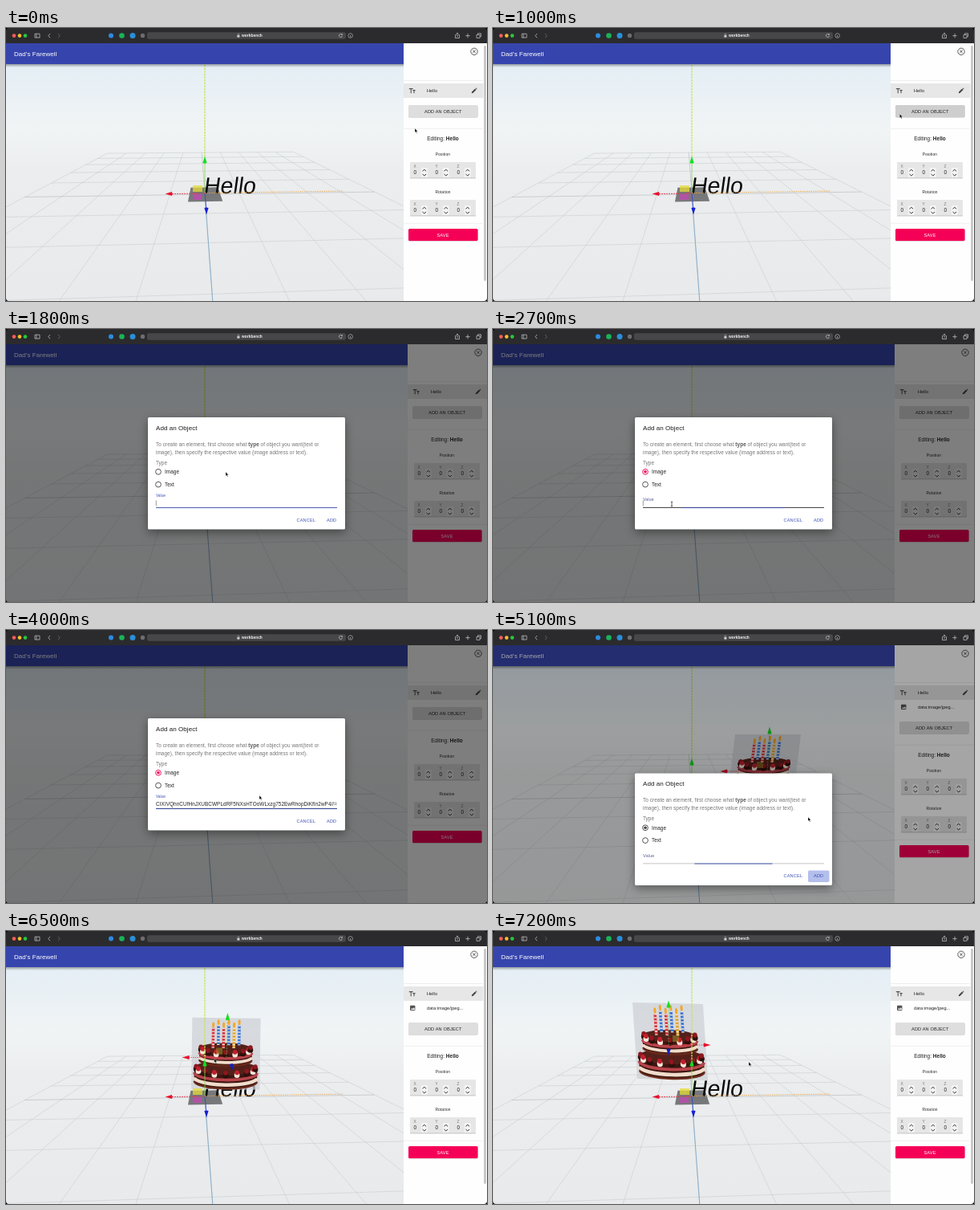
An HTML page for the animation above (7300 ms loop, 600 by 340 pixels).

```html
<!DOCTYPE html>
<html lang="en">
<head>
<meta charset="utf-8">
<title>Object editor</title>
<style>
html, body { margin: 0; width: 100%; height: 100%; overflow: hidden; background: #000; }
svg { display: block; width: 600px; height: 340px; }
text { font-family: "Liberation Sans", Arial, Helvetica, sans-serif; white-space: pre; }
#paper { filter: drop-shadow(0 4px 6px rgba(0,0,0,.4)); }
</style>
</head>
<body>
<svg id="stage" viewBox="0 0 600 340" xmlns="http://www.w3.org/2000/svg"></svg>
<script>
const LOOP = 7300, STEP = 100;
const OPEN = 1072, PICK = 2200, FOCUS = 2651, PASTE = 3400, CLOSE = 5027, BLUR = 5051;
const INDIGO = '#3f51b5', PINK = '#f50057';
const $ = id => document.getElementById(id);

// Markup helpers
const text = (x, y, size, str, more = '') =>
  `<text x="${x}" y="${y}" font-size="${size}" letter-spacing=".06" ${more}>${str}</text>`;
const mid = 'text-anchor="middle"';
const rect = (x, y, w, h, fill, more = '') =>
  `<rect x="${x}" y="${y}" width="${w}" height="${h}" fill="${fill}" ${more}/>`;
const circle = (x, y, r, fill, more = '') =>
  `<circle cx="${x}" cy="${y}" r="${r}" fill="${fill}" ${more}/>`;
const line = (x1, y1, x2, y2, stroke, w, more = '') =>
  `<line x1="${x1}" y1="${y1}" x2="${x2}" y2="${y2}" stroke="${stroke}" stroke-width="${w}" ${more}/>`;
const path = (d, stroke, w = .8, fill = 'none') =>
  `<path d="${d}" fill="${fill}" stroke="${stroke}" stroke-width="${w}"/>`;
const caps = (x, y, str, fill, more = '') =>
  `<text x="${x}" y="${y}" font-size="5.6" letter-spacing=".16" fill="${fill}" ${more}>${str}</text>`;
const head = (x, y, turn, fill) =>
  `<path d="M-4 -2.6L4.5 0L-4 2.6Q-5 0 -4 -2.6z" fill="${fill}" transform="translate(${x} ${y}) rotate(${turn})"/>`;

// Ground plane seen by a slightly turned camera
function ground(x, z) {
  const a = .033, s = 1 / (.02294 - .004033 * (z - a * x));
  return [248 + (x + a * z) * s, 96 + s / .392];
}
function gridLine(x1, z1, x2, z2, color, w = .5) {
  return line(...ground(x1, z1), ...ground(x2, z2), color, w);
}
function grid() {
  let s = '';
  for (let i = -5; i <= 5; i++) {
    const c = i ? '#c3c7ca' : '#a9adb0';
    s += gridLine(-5, i, 5, i, c) + gridLine(i, -5, i, 5, c);
  }
  return s + gridLine(0, 0, 0, 5, '#6c9fc6', .7);
}

function scene() {
  const plate = [[-.42, -.48], [.42, -.48], [.46, .42], [-.46, .42]].map(p => ground(...p)).join(' ');
  return rect(0, 45, 501, 295, 'url(#sky)') + grid() +
    `<polygon points="${plate}" fill="#77787a"/>` +
    `<text font-size="28.5" fill="#0b0b0b" transform="translate(246 206) skewX(-8)">Hello</text>` +
    `<g id="cake">${cake()}</g>` +
    line(248, 46, 248, 160, '#c4e64e', 1.3, 'stroke-dasharray="2.6 1"') +
    line(248, 167, 248, 205, '#7fd64a', .8) +
    line(207, 206.5, 248, 206, '#e8304a', .9, 'stroke-dasharray="2 1"') +
    line(248, 205.5, 421, 203, '#efaa4a', .9, 'stroke-dasharray="1.5 1.2"') +
    line(248, 206, 250, 226, '#3540d8', .8) +
    rect(233, 196, 12, 8, '#e6dc36', 'opacity=".75"') +
    rect(233, 207, 11, 7, '#d23fc0', 'opacity=".65"') +
    head(203, 206.5, 180, '#e8102c') + head(248, 164, -90, '#12e01e') + head(250, 228, 90, '#1420d8') +
    '<g id="axes"></g>';
}

// Two-tier cake on a 100 by 100 board
function tier(x, y, w, h, r) {
  const d = `M${x} ${y}v${h}a${w / 2} ${r} 0 0 0 ${w} 0v${-h}z`;
  const band = (k, c, t) => path(`M${x} ${y + h * k}a${w / 2} ${r} 0 0 0 ${w} 0`, c, t);
  let s = path(d, 'none', 0, '#3b1610') + band(.36, '#b8434b', 4) + band(.72, '#f1dccb', h * .26) +
    band(1, '#6b2a1a', 2.5) +
    `<ellipse cx="${x + w / 2}" cy="${y}" rx="${w / 2}" ry="${r}" fill="#54211a"/>`;
  for (let i = 0; i <= 8; i++) {
    const a = Math.PI * i / 8, bx = x + w / 2 - Math.cos(a) * w * .47, by = y + Math.sin(a) * r * .9;
    s += circle(bx, by + 1.5, 4, i % 2 ? '#f6e6da' : '#2c0f0b') + circle(bx, by - 2, 3.3, i % 2 ? '#c21f2c' : '#8e1720');
  }
  return s;
}
function cake() {
  let s = rect(0, 0, 100, 100, '#cdd0d6', 'opacity=".72"') + tier(4, 70, 92, 19, 10) + tier(11, 43, 77, 16, 8);
  const tints = ['#d8363f', '#3b77d0', '#d8363f', '#3b77d0', '#e0a52e', '#3b77d0'];
  tints.forEach((c, i) => {
    const x = 31 + i * 7.6, y = i % 2 ? 10 : 14;
    s += line(x, y, x, y + 28, c, 4) + line(x, y, x, y + 28, '#f3e9e2', 4, 'stroke-dasharray="1.5 3"') +
      `<ellipse cx="${x}" cy="${y - 4}" rx="1.8" ry="4" fill="#f2a82c"/>`;
  });
  return s;
}

function browserBar() {
  const icon = d => path(d, '#b9b9bc', .8);
  return rect(0, 0, 600, 19, '#2b2b2d') +
    ['#ff5f57', '#febc2e', '#28c840'].map((c, i) => circle(10 + 7 * i, 9.6, 2.3, c)).join('') +
    icon('M36 7.2h6v4.8h-6z M38 7.2v4.8 M55 7l-2.2 2.6L55 12.2') +
    path('M65 7l2.2 2.6L65 12.2', '#6a6a6d') +
    circle(131, 9.5, 3, '#2b8be0') + circle(144.5, 9.5, 3.3, '#19b35a') +
    circle(158, 9.5, 3.5, '#2a8fd8') + circle(170.5, 9.5, 2.7, '#6d6d70') +
    rect(176, 5.3, 248, 8.4, '#47474a', 'rx="2.2"') +
    rect(288.4, 9, 3, 2.6, '#d0d0d2') + path('M289 9V8a.9 .9 0 0 1 1.8 0v1', '#d0d0d2', .5) +
    text(294, 11.4, 4.8, 'workbench', 'fill="#f0f0f2" font-weight="bold"') +
    icon('M419 8.2a2 2 0 1 0 .4 1.6 M419.4 7v1.5H418') +
    circle(429.6, 9.5, 2.8, 'none', 'stroke="#b9b9bc" stroke-width=".7"') + icon('M429.6 9v2.2') +
    icon('M561.5 8.5h-1v4h5v-4h-1 M563 11V6.2 M561.6 7.4L563 6l1.4 1.4') +
    icon('M573.3 9.6h5.4 M576 6.9v5.4') +
    icon('M587 8.4h4v4h-4z M588.5 8.2V6.8h4v4h-1.3');
}

function fields(y) {
  let s = rect(504, y, 82, 20, '#e6e6e6', 'rx="1"') + line(504, y + 20, 586, y + 20, '#9a9a9a', .5);
  ['X', 'Y', 'Z'].forEach((c, i) => {
    const x = 508.5 + 27 * i;
    s += text(x, y + 7, 4.8, c, 'fill="#777"') + text(x, y + 15.4, 6.4, '0', 'fill="#222"') +
      rect(x + 9.3, y + 7, 8, 12, '#f4f4f4', 'rx="1.5"') +
      path(`M${x + 11} ${y + 11.3}l2.3 -2l2.3 2 M${x + 11} ${y + 15}l2.3 2l2.3 -2`, '#222', .9);
  });
  return s;
}
const rule = y => line(496, y, 595, y, '#dedede', .5);
function sidebar() {
  const cap = (y, s) => `<text x="545" y="${y}" font-size="4.8" letter-spacing=".16" fill="#222" ${mid}>${s}</text>`;
  return rect(496, 19, 110, 321, '#fefefe') +
    circle(584, 29.3, 4.2, 'none', 'stroke="#333" stroke-width=".8"') +
    path('M582.2 27.5l3.6 3.6 M585.8 27.5l-3.6 3.6', '#333') +
    rule(65.5) + rect(496, 69, 99.5, 18, '#e7e7e7') +
    path('M502.8 75.6h4.8 M505.2 75.6v5.6 M507.4 77.6h3.2 M509 77.6v3.6', '#555', 1.1) +
    text(525, 80, 5.6, 'Hello', 'fill="#222"') +
    path('M580.8 81.2l.3 -1.7l4 -4l1.4 1.4l-4 4z M585.6 75l.6 -.6l1.4 1.4l-.6 .6z', 'none', 0, '#444') +
    '<g id="item">' + rect(504, 92.8, 6.4, 6.2, '#555', 'rx=".8"') +
    path('M505 98l1.5 -2l1 1.2l1.3 -1.9l1.5 2.7z', 'none', 0, '#fff') +
    text(525, 98, 5.6, 'data' + ':image/jpeg...', 'fill="#222"') + '</g>' +
    '<g id="lower">' +
    rect(502, 96.6, 86.5, 15, '#bbb', 'rx="1.6"') +
    `<rect id="addBtn" x="502" y="96" width="86.5" height="15" rx="1.6"/>` +
    caps(545.3, 105.6, 'ADD AN OBJECT', '#222', mid) + rule(125.3) +
    text(545, 139.8, 6.4, 'Editing: <tspan font-weight="bold">Hello</tspan>', mid + ' fill="#222"') +
    cap(158.8, 'Position') + fields(167) + cap(205.8, 'Rotation') + fields(214) + rule(243.3) +
    rect(502, 250.6, 86.5, 15, '#c9a0ad', 'rx="1.6"') + rect(502, 250, 86.5, 15, PINK, 'rx="1.6"') +
    caps(545, 259.6, 'SAVE', '#fff', mid) + '</g>';
}

// Meaningless letters for the pasted value
function gibberish(n) {
  let seed = 7, s = '';
  while (s.length < n) {
    seed = seed * 16807 % 2147483647;
    const k = seed % 58;
    s += k < 26 ? String.fromCharCode(65 + k) : k < 52 ? String.fromCharCode(71 + k) : k - 50;
  }
  return s + '//=';
}

function dialog() {
  const ring = y => circle(190, y, 3.4, 'none', 'stroke="#444" stroke-width=".9"');
  const grey = 'fill="#757575"';
  return rect(177, 110, 246, 139.5, '#fff', 'id="paper" rx="1.6"') +
    text(187, 126, 8, 'Add an Object', 'fill="#1c1c1c"') +
    text(187, 146, 6.4, 'To create an element, first choose what <tspan font-weight="bold" fill="#555">type</tspan> of object you want(text or', grey) +
    text(187, 156, 6.4, 'image), then specify the respective value (image address or text).', grey) +
    text(187, 168.8, 6.4, 'Type', grey) +
    `<g id="ring">${ring(177.8)}</g><circle id="dot" cx="190" cy="177.8" r="1.8"/>` + ring(193.6) +
    text(198, 180.1, 6.4, 'Image', 'fill="#222"') + text(198, 195.9, 6.4, 'Text', 'fill="#222"') +
    '<text id="label" x="187">Value</text>' +
    line(187, 222.4, 413, 222.4, '#8a8a8a', .5, 'id="base"') +
    line(187, 222.6, 413, 222.6, INDIGO, .9, 'id="focus"') +
    line(187.3, 213.5, 187.3, 220.5, '#333', .5, 'id="caret"') +
    `<g id="value" clip-path="url(#field)">${text(413, 219.2, 6.4, gibberish(66), 'text-anchor="end" fill="#222"')}</g>` +
    rect(393, 231, 26.5, 14.5, '#b4bfec', 'id="ripple" rx="1.6"') +
    caps(362.5, 240, 'CANCEL', INDIGO) + caps(400, 240, 'ADD', INDIGO);
}

$('stage').innerHTML =
  `<defs>
    <linearGradient id="sky" x1="0" y1="0" x2="0" y2="1">
      <stop offset="0" stop-color="#e4eef5"/><stop offset=".28" stop-color="#f1f4f5"/>
      <stop offset=".45" stop-color="#ebedee"/><stop offset="1" stop-color="#e8eaeb"/>
    </linearGradient>
    <linearGradient id="drop" x1="0" y1="0" x2="0" y2="1">
      <stop offset="0" stop-color="#000" stop-opacity=".35"/><stop offset="1" stop-color="#000" stop-opacity="0"/>
    </linearGradient>
    <clipPath id="win"><rect width="600" height="340" rx="4"/></clipPath>
    <clipPath id="field"><rect x="187" y="210" width="226" height="12"/></clipPath>
  </defs>
  <g clip-path="url(#win)">` +
  scene() + rect(0, 45, 501, 4, 'url(#drop)') + rect(0, 19, 501, 26, '#3645ad') +
  text(10, 35, 8, 'Dad\'s Farewell', 'fill="#fff"') +
  `<g id="side">${sidebar()}</g>` +
  rect(596.3, 22, 2.4, 293, '#bdbdbd', 'id="bar" rx="1.2"') +
  rect(0, 19, 600, 321, '#000', 'id="shade"') + `<g id="dialog">${dialog()}</g>` + browserBar() +
  `</g>
  <path id="arrow" d="M0 0v5l1.2 -1l.9 1.9l.8 -.4l-.9 -1.8h1.6z" fill="#000" stroke="#fff" stroke-width=".35"/>
  <path id="beam" d="M-1.2 -2.8h2.4 M0 -2.8v5.6 M-1.2 2.8h2.4" fill="none" stroke="#222" stroke-width=".7"/>`;

// Motion helpers
const clamp = v => Math.min(1, Math.max(0, v));
const mix = (a, b, k) => a + (b - a) * k;
function bezier(x1, x2) {
  return p => {
    let lo = 0, hi = 1;
    for (let i = 0; i < 22; i++) {
      const s = (lo + hi) / 2, x = 3 * s * (1 - s) ** 2 * x1 + 3 * s * s * (1 - s) * x2 + s ** 3;
      if (x < p) lo = s; else hi = s;
    }
    return 3 * lo * lo - 2 * lo ** 3;
  };
}
const easeOut = bezier(0, .2), sharp = bezier(.4, .6);
const go = (t, from, span, ease = easeOut) => ease(clamp((t - from) / span));
function track(keys, t) {
  let i = 0;
  while (i < keys.length - 2 && t >= keys[i + 1][0]) i++;
  const [a, ...p] = keys[i], [b, ...q] = keys[i + 1], k = clamp((t - a) / (b - a));
  return p.map((v, n) => mix(v, q[n], k));
}
const pointer = [
  [0, 510, 125], [600, 507, 107], [1200, 507.5, 107], [1600, 330, 178], [2100, 190, 178], [2300, 190, 178],
  [2600, 223, 218], [3400, 223, 218], [4000, 316, 206], [4700, 403, 237], [4900, 403, 237], [5100, 393, 233],
  [5700, 325.5, 178], [6400, 274, 163], [6900, 203, 143], [7200, 319, 163]
];
const drag = [[5700, 0], [6400, .43], [6900, 1]];

const show = (id, on) => $(id).setAttribute('visibility', on ? 'inherit' : 'hidden');
const set = (id, props) => { for (const k in props) $(id).setAttribute(k, props[k]); };

function drawCake(t) {
  const on = t >= CLOSE, [k] = track(drag, t);
  show('cake', on);
  show('axes', on);
  const m = [[.82, .88], [0, .02], [-.1, .06], [.82, .95], [302, 174], [130, 89]].map(([a, b]) => mix(a, b, k));
  set('cake', { transform: `matrix(${m})` });
  const x = mix(342, 219, k), y = mix(176, 142, k), side = x < 248 ? 1 : -1;
  const rx = x + side * mix(54, 48, k), gx = x + mix(3, 0, k), gy = y - 51;
  const bx = x + mix(15, 0, k), by = y + mix(16, 9, k);
  $('axes').innerHTML =
    line(x, y, rx, y, '#e8304a', .8, 'stroke-dasharray="1.5 1.2"') +
    line(x, y, gx, gy, '#57c84a', .6, 'stroke-dasharray="2 1.5"') +
    rect(x + side * 9 - 4, y - 12, 8, 8, '#a8a32c', 'opacity=".45"') +
    head(rx, y, side > 0 ? 0 : 180, '#e8102c') + head(gx, gy, -90, '#12e01e') +
    head(bx, by, mix(45, 90, k), '#1420b8');
}

function render(now) {
  const t = Math.floor(now % LOOP / STEP) * STEP;
  const level = go(t, OPEN, 225) - go(t, CLOSE, 195, sharp);
  const modal = t >= OPEN && t < CLOSE + 195, added = t >= CLOSE;
  const lit = go(t, OPEN, 200) - go(t, PICK, 200) + go(t, FOCUS, 200) - go(t, BLUR, 200);
  const picked = t >= PICK, pasted = t >= PASTE && t < CLOSE;

  drawCake(t);
  show('item', added);
  show('bar', !modal);
  set('side', { transform: `translate(${modal ? 5 : 0} 0)` });
  set('lower', { transform: `translate(0 ${added ? 18 : 0})` });
  set('addBtn', { fill: t >= 500 && t < 1400 ? '#cecece' : '#dedede' });
  set('shade', { opacity: level * .5 });

  show('dialog', modal);
  set('dialog', { transform: `translate(0 ${(1 - level) * 230})` });
  const tint = picked && !added ? PINK : '#444';
  $('ring').firstChild.setAttribute('stroke', tint);
  set('dot', { fill: tint });
  show('dot', picked);
  const tone = [63, 81, 181].map(c => Math.round(mix(117, c, lit)));
  const size = mix(6.4, 4.8, lit);
  set('label', { 'font-size': size, y: mix(217, 207.4, lit) + size * .36, fill: `rgb(${tone})` });
  const hover = t >= 2500 && t < 4100;
  set('base', { stroke: hover ? '#222' : '#8a8a8a', 'stroke-width': hover ? .9 : .5 });
  set('focus', { x1: 300 - 113 * lit, x2: 300 + 113 * lit });
  show('focus', lit > .01);
  show('caret', lit > .3 && !pasted && !added);
  show('value', pasted);
  show('ripple', t >= 4900);

  const [px, py] = track(pointer, t), typing = t >= 2600 && t < 3600;
  show('arrow', !typing);
  show('beam', typing);
  set(typing ? 'beam' : 'arrow', { transform: `translate(${px} ${py})` });
}

let start;
function tick(now) {
  if (start === undefined) start = now;
  render(now - start);
  requestAnimationFrame(tick);
}
render(0);
requestAnimationFrame(tick);
</script>
</body>
</html>
```
